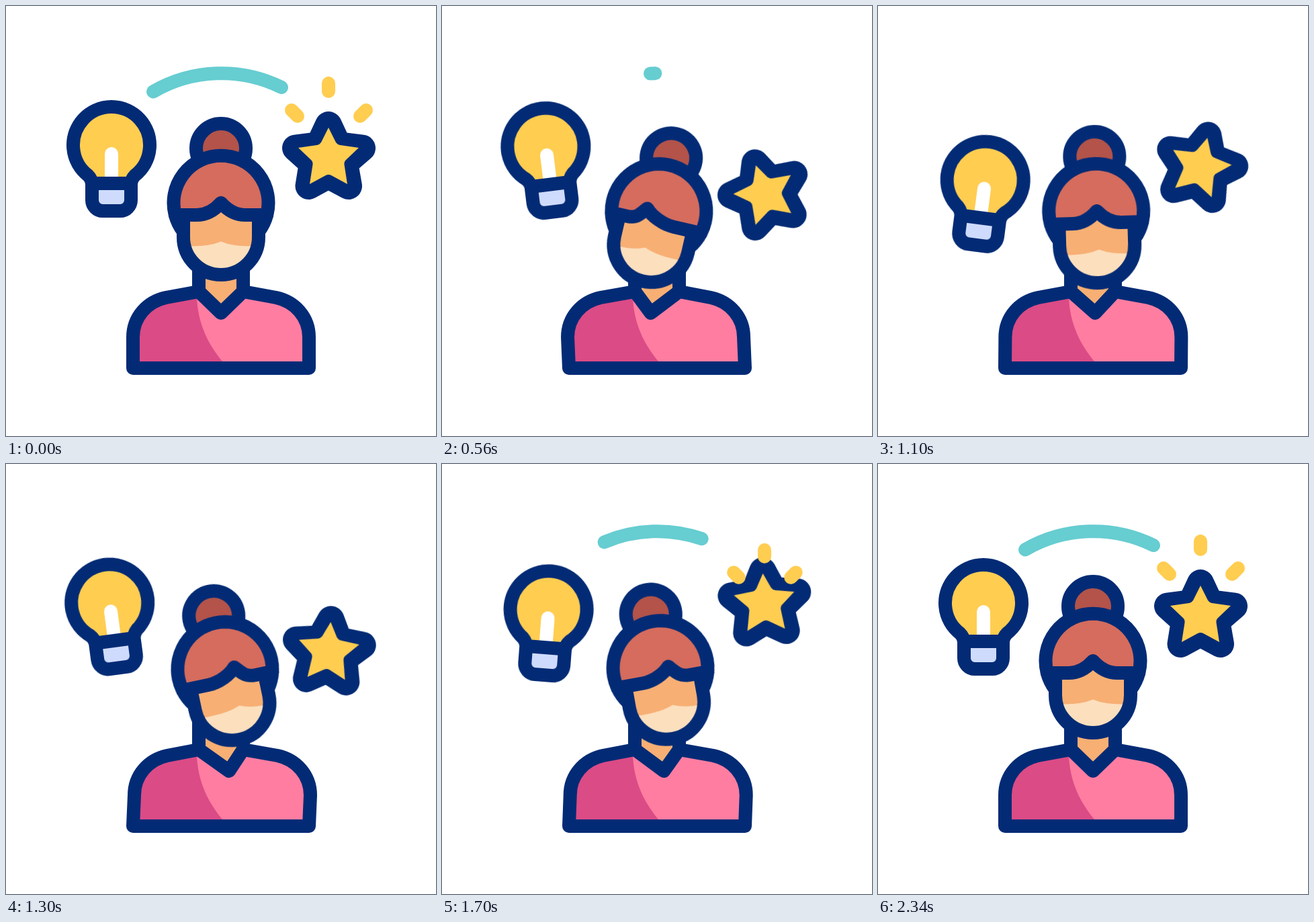
An HTML page that plays this animation: 640x640 px, repeating every 2400 ms.

```html
<!DOCTYPE html>
<html lang="en">
<head>
<meta charset="utf-8">
<title>Idea and star</title>
<style>
  html, body { margin: 0; width: 100%; height: 100%; overflow: hidden; background: #fff; }
  svg { display: block; width: 100vw; height: 100vh; }

  .line { stroke: #032b75; stroke-width: 20; stroke-linejoin: round; stroke-linecap: round; }
  .open { fill: none; }
  .yellow { fill: #ffcd50; }

  #head, #bulb, #bulbTilt, #star, #starTilt, #rays, #arc {
    animation: 2400ms cubic-bezier(.37, 0, .63, 1) infinite;
  }

  #head { animation-name: nod; transform-origin: 320px 306px; }
  @keyframes nod {
    0%, 5.83%     { transform: translate(0, 0) rotate(0deg); }
    25%, 37.5%    { transform: translate(0, 12.2px) rotate(13.2deg); }
    52.5%, 62.5%  { transform: translate(8.6px, 12px) rotate(-11.9deg); }
    95.83%, 100%  { transform: translate(0, 0) rotate(0deg); }
  }

  #bulb { animation-name: bulbToss; }
  @keyframes bulbToss {
    0%        { transform: translateY(0); }
    14.17%    { transform: translateY(52px); }
    29.58%    { transform: translateY(-25px); }
    45.21%    { transform: translateY(52px); }
    59.58%    { transform: translateY(-24px); }
    73.33%    { transform: translateY(12px); }
    90%, 100% { transform: translateY(0); }
  }

  #bulbTilt { animation-name: bulbTilt; transform-origin: 157px 228px; }
  @keyframes bulbTilt {
    0%        { transform: rotate(0deg); }
    15.42%    { transform: rotate(-15deg); }
    38.75%    { transform: rotate(15.7deg); }
    56.67%    { transform: rotate(-8.7deg); }
    72.5%     { transform: rotate(4.8deg); }
    90%, 100% { transform: rotate(0deg); }
  }

  #star { animation-name: starToss; }
  @keyframes starToss {
    0%          { transform: translateY(0); }
    6.25%       { transform: translateY(-16px); }
    22.71%      { transform: translateY(54.5px); }
    37.92%      { transform: translateY(-29px); }
    53.54%      { transform: translateY(54.5px); }
    68.75%      { transform: translateY(-19px); }
    85.83%      { transform: translateY(3px); }
    96.7%, 100% { transform: translateY(0); }
  }

  #starTilt { animation-name: starTilt; transform-origin: 480px 222.5px; }
  @keyframes starTilt {
    0%, 6.25%    { transform: rotate(0deg); }
    25%          { transform: rotate(-18.5deg); }
    46.67%       { transform: rotate(14.5deg); }
    62.5%        { transform: rotate(-7deg); }
    81.67%       { transform: rotate(2deg); }
    95.83%, 100% { transform: rotate(0deg); }
  }

  #rays {
    fill: none; stroke: #ffcd50; stroke-width: 20; stroke-linecap: round;
    animation-name: rays, rayWidth; transform-origin: 480px 193px;
  }
  #rays path { vector-effect: non-scaling-stroke; }
  @keyframes rays {
    0%           { transform: scale(1); }
    12.5%        { transform: scale(1.46); animation-timing-function: step-end; }
    62.5%        { transform: scale(.3); animation-timing-function: cubic-bezier(.25, .46, .45, .94); }
    74.17%       { transform: scale(.88); animation-timing-function: cubic-bezier(.25, .46, .45, .94); }
    95.83%, 100% { transform: scale(1); }
  }
  @keyframes rayWidth {
    0%, 9%       { stroke-width: 20; opacity: 1; }
    12.5%        { stroke-width: 0; opacity: 1; }
    12.6%, 62.4% { stroke-width: 0; opacity: 0; }
    62.5%        { stroke-width: 0; opacity: 1; }
    65%, 100%    { stroke-width: 20; opacity: 1; }
  }

  #arc {
    fill: none; stroke: #66cdd1; stroke-width: 20; stroke-linecap: round;
    animation-name: trim, arcShow;
  }
  @keyframes trim {
    0%, 4.58%      { stroke-dasharray: 100 200; stroke-dashoffset: 0; }
    26.04%, 56.25% { stroke-dasharray: 0 200; stroke-dashoffset: -50; }
    78.33%, 100%   { stroke-dasharray: 100 200; stroke-dashoffset: 0; }
  }
  @keyframes arcShow {
    0%     { opacity: 1; animation-timing-function: step-end; }
    26.04% { opacity: 0; animation-timing-function: step-end; }
    56.25% { opacity: 1; animation-timing-function: step-end; }
    100%   { opacity: 1; }
  }
</style>
</head>
<body>
<svg viewBox="0 0 640 640">
  <path id="arc" pathLength="100" d="M219 127.5A203 203 0 0 1 410 121"/>

  <g id="bulb"><g id="bulbTilt">
    <path class="yellow" d="M128 264Q127 257 122 252A57 57 0 1 1 192 252Q187 257 186 264Z"/>
    <path d="M157 220V258" fill="none" stroke="#fff" stroke-width="20" stroke-linecap="round"/>
    <path fill="#cfdbfd" d="M128 264H186V289a16 16 0 0 1 -16 16H144a16 16 0 0 1 -16 -16Z"/>
    <path class="line open" d="M128 264Q127 257 122 252A57 57 0 1 1 192 252Q187 257 186 264V289a16 16 0 0 1 -16 16H144a16 16 0 0 1 -16 -16ZH186"/>
  </g></g>

  <g id="star"><g id="starTilt">
    <path class="line" style="stroke-width:40" d="M480 177L494 207L530 211.500L504 234L510 268L480 252L450.500 268L456 234L431 211.500L466 207Z"/>
    <path class="yellow" d="M480 181L491 203Q493 206 497 207L525 211L506 229Q503 232 503.500 236L508 265L484 252Q480 250 476 252L452 265L456.500 236Q457 232 454 229L435 211L463 207Q467 206 469 203Z"/>
  </g></g>

  <g id="rays">
    <path d="M480 115V127"/>
    <path d="M425 155L434 164"/>
    <path d="M536 155L527 164"/>
  </g>

  <path id="neck" class="line" fill="#f7af74"/>
  <path id="shirt" fill="#ff7da1"/>
  <path id="shade" fill="#db4b86"/>
  <path id="outline" class="line open"/>

  <g id="head">
    <circle class="line" cx="320" cy="212" r="37" fill="#b3534a"/>
    <path fill="#fcdfbd" d="M264 311V344a56 56 0 0 0 112 0V311Z"/>
    <path id="brow" fill="#f7af74"/>
    <path class="line open" d="M264 311V344a56 56 0 0 0 112 0V311"/>
    <path id="hair" class="line" fill="#d56c5d"/>
    <path class="line open" d="M264 336A70.500 70.500 0 0 1 251.800 311M376 336A70.500 70.500 0 0 0 388.200 311"/>
  </g>
</svg>
<script>
  // Morphing paths for a shift of the shoulders, the collar tip and the hair parting.
  function figure(sway, tip, part) {
    const x = n => n + sway, p = n => n + part, h = n => n + part / 2;
    const left = `M189 539L${x(189)} 493C${x(189)} 463 ${x(210)} 440 ${x(238)} 434L287 425`;
    const collar = `L${320 + tip} 457L353 425`;
    const shirt = `${left}${collar}L${x(402)} 434C${x(430)} 440 ${x(451)} 463 ${x(451)} 493L451 539Z`;
    const mid = 320 + tip * 0.8;
    return {
      neck: `M287 385V425${collar}V385Z`,
      shirt,
      shade: `${left}L284 432C285 470 299 505 331 539Z`,
      outline: shirt,
      brow: `M266 300V357Q${mid - 20} 359 ${mid} 350.5Q${mid + 20} 359 374 357V300Z`,
      hair: `M251.8 311A70.5 70.5 0 1 1 388.2 311L${h(356)} 311C${h(340)} 311 ${p(329)} 303 ${p(320)} 293` +
            `C${p(311)} 303 ${h(300)} 311 ${h(284)} 311Z`
    };
  }

  const rest = figure(0, 0, 0), right = figure(-2, -9.5, -18), left = figure(2, 12, 14);
  const poses = [[0, rest], [140, rest], [600, right], [900, right],
                 [1260, left], [1500, left], [2300, rest], [2400, rest]];

  for (const id in rest) {
    const frames = poses.map(([ms, pose]) => ({
      offset: ms / 2400,
      d: `path("${pose[id]}")`,
      easing: 'cubic-bezier(.37, 0, .63, 1)'
    }));
    const el = document.getElementById(id);
    el.setAttribute('d', rest[id]);
    el.animate(frames, { duration: 2400, iterations: Infinity });
  }
</script>
</body>
</html>
```
